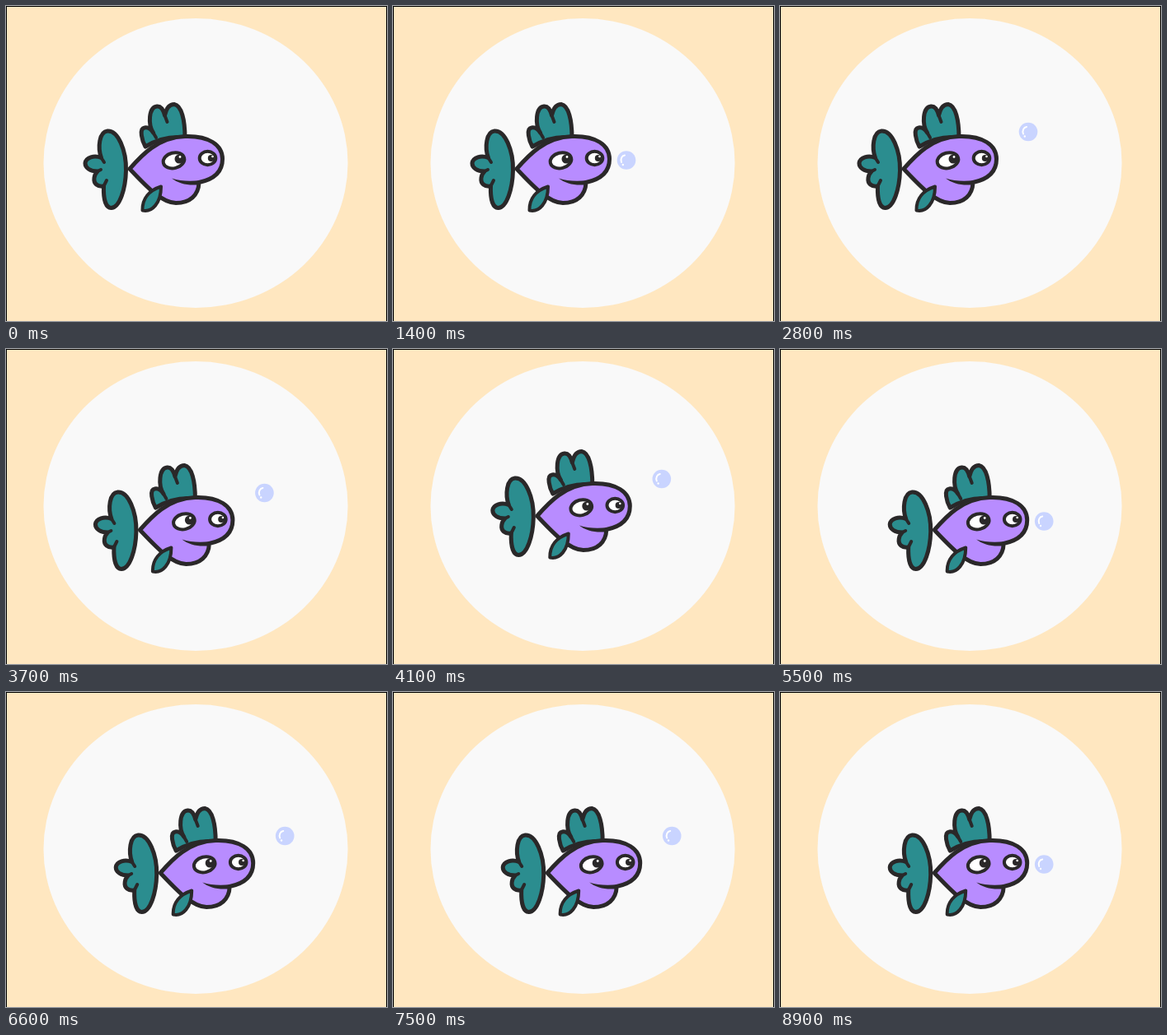
Animation of 462x383 px, one loop 9.4 s. Source, as an HTML page:

```html
<!DOCTYPE html>
<html lang="en">
<head>
<meta charset="utf-8">
<title>Fish and bubble</title>
<style>
  html, body { margin: 0; width: 100%; height: 100%; overflow: hidden; background: #ffe7c0; }
  svg { display: block; width: 462px; height: 383px; }
  .ink { stroke: #2a2829; stroke-width: 5; stroke-linejoin: round; stroke-linecap: round; fill: none; }
  .thin { stroke-width: 4; }
  .teal { fill: #2b8d8f; }
  .skin { fill: #b88cff; }
  .dark { fill: #2a2829; }
  .white { fill: #fff; }
</style>
</head>
<body>
<svg viewBox="0 0 462 383" xmlns="http://www.w3.org/2000/svg">
  <rect width="462" height="383" fill="#ffe7c0"/>
  <ellipse cx="230" cy="191" rx="184.5" ry="176" fill="#f9f9f9"/>
  <path d="M0 .5H462M.5 0V383M461.5 0V383" stroke="#000"/>

  <g id="fish">
    <!-- dorsal fin -->
    <path class="ink teal" d="M169 171C165 164 161 149 168 148C173 147 176 150 178.500 154C172 144 173 123 183 122C188 121.500 191 127 192.500 133C194 126 197 119.500 204 119.500C213 121 217 139 217 160C198 158 182 163 169 171Z"/>
    <path class="ink thin" d="M178.500 154L182 160M192.500 133L195.500 141"/>

    <!-- tail -->
    <path class="ink teal" d="M123 152C136 151 146 176 145.500 200C145 222 138 245 127.500 245.500C120 245 118 232 118.500 219C111 220 106 216 107 209C107.500 205 109 203 111 201C102 201 96 197 96 191C97 184 107 181 115.500 184.500C111 172 113 153 123 152Z"/>
    <path class="ink thin" d="M115.500 184.500L119 190M111 201L115 199M118.500 219L122 212"/>

    <!-- body -->
    <path class="ink skin" d="M150 198C164 182 184 159.500 217 158.500C246 157.500 262.500 169 262.500 186C262.500 203 251 211 234 214.500C233.500 230 223 239.500 206 239.500C188 239 169 218 150 198Z"/>
    <path class="dark" d="M201 209.500C211 213 224 213.500 235 212L235 217C222 219 209 216 201 209.500Z"/>

    <!-- eyes -->
    <ellipse class="ink thin white" cx="203.500" cy="187.800" rx="13" ry="9.300" transform="rotate(-14 203.500 187.800)"/>
    <circle class="dark" cx="210" cy="186" r="5.500"/>
    <circle class="white" cx="211" cy="183.500" r="1.400"/>
    <ellipse class="ink thin white" cx="244.500" cy="185" rx="9.800" ry="8.200"/>
    <circle class="dark" cx="248.800" cy="185" r="4"/>
    <circle class="white" cx="250.500" cy="183" r="1.300"/>

    <!-- pelvic fin -->
    <path class="ink thin teal" d="M188 219.500C174 224 165 234 165.500 248.500C177 251 188 240 188 219.500Z"/>
  </g>

  <g id="bubble">
    <circle r="11.300" fill="#c9d4ff"/>
    <path d="M-6 2.500C-7.500 -1.500 -5.500 -5.500 -2 -6" fill="none" stroke="#fff" stroke-width="2" stroke-linecap="round"/>
    <circle class="white" cx="-4.200" cy="5.500" r="1.200"/>
  </g>
</svg>

<script>
const LOOP = 9400;
const STEP_X = 12.4, BOB = 5, DIP = 22;
const LOW = [283, 187.5], HIGH = [301, 153];

// The fish alternates: step forward with a small bob, then dip in place.
const swimTimes = [3200, 3700, 4100, 4600, 5100, 5500];
// Each beat moves the bubble between its low and high spot.
const beatTimes = [500, 900, 1400, 1800, 2300, 2800, 3200, 3700, 4200, 4600,
  5100, 5600, 6100, 6600, 7000, 7500, 7900, 8400, 8900];

const fish = document.getElementById("fish");
const bubble = document.getElementById("bubble");
const passed = (times, t) => times.filter(time => time <= t).length;
const place = (node, x, y) => node.setAttribute("transform", `translate(${x} ${y})`);

function draw(t) {
  const moves = passed(swimTimes, t);
  const dx = Math.ceil(moves / 2) * STEP_X;
  const dy = moves === 0 ? 0 : moves % 2 ? BOB : DIP;
  place(fish, dx, dy);

  const beats = passed(beatTimes, t);
  const [x, y] = beats % 2 ? LOW : HIGH;
  bubble.setAttribute("visibility", beats ? "visible" : "hidden");
  place(bubble, x + dx, y + dy);
}

const start = performance.now();
function tick() {
  draw((performance.now() - start) % LOOP);
  requestAnimationFrame(tick);
}
tick();
</script>
</body>
</html>
```
